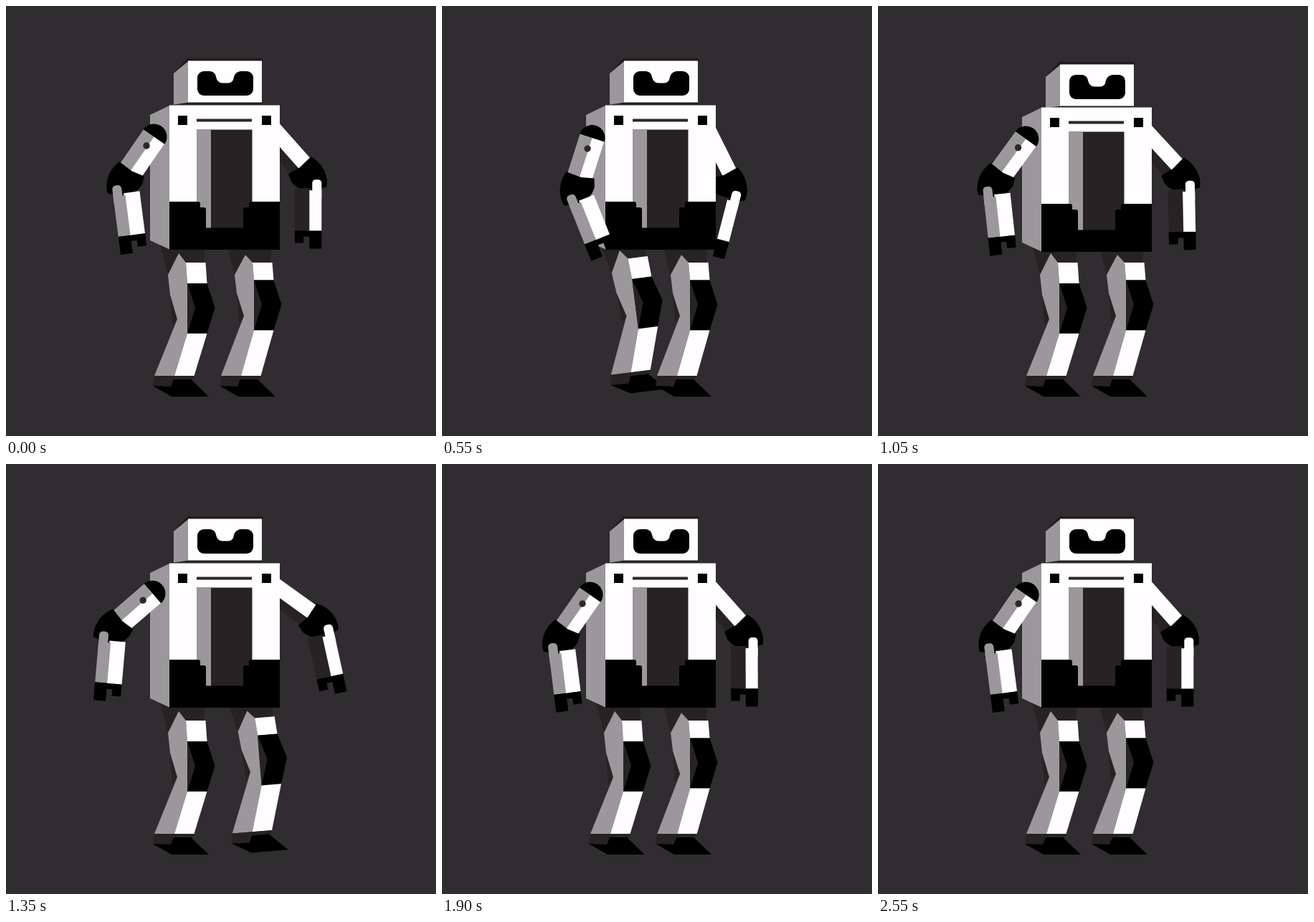
Recreate the animation shown at these times as an HTML page with a canvas. Size 600x600 px, loop 3000 ms.

```html
<!DOCTYPE html>
<html lang="en">
<head>
<meta charset="utf-8">
<title>Robot steps</title>
<style>
  html, body { margin: 0; width: 100%; height: 100%; overflow: hidden; background: #302d30; }
  canvas { display: block; width: 600px; height: 600px; }
</style>
</head>
<body>
<canvas id="stage" width="600" height="600"></canvas>
<script>
const ctx = document.getElementById('stage').getContext('2d');
const LOOP = 3000, STEP = 50;
const BG = '#302d30', DARK = '#272223', GRAY = '#9b989b', WHITE = '#fffdff', BLACK = '#000';

const clamp = x => Math.min(1, Math.max(0, x));
const part = (t, a, b) => clamp((t - a) / (b - a));
const ease = u => (1 - Math.cos(Math.PI * u)) / 2;
const bump = (t, a, peak, b) => ease(t < peak ? part(t, a, peak) : 1 - part(t, peak, b));
const rad = deg => deg * Math.PI / 180;

// Arm swing: -1 is fully in, 0 is rest, 1 is fully out.
function swing(t) {
  if (t < 525) return -ease(part(t, 0, 525));
  if (t < 1525) return -Math.cos(Math.PI * part(t, 525, 1525));
  return 1 - ease(part(t, 1525, 1930));
}

function poly(color, ...points) {
  ctx.fillStyle = color;
  ctx.beginPath();
  points.forEach(p => ctx.lineTo(...p));
  ctx.fill();
}

function box(color, x, y, w, h, r = 0) {
  ctx.fillStyle = color;
  ctx.beginPath();
  ctx.roundRect(x, y, w, h, r);
  ctx.fill();
}

function disc(color, x, y, r, from = 0, to = 2 * Math.PI) {
  ctx.fillStyle = color;
  ctx.beginPath();
  ctx.arc(x, y, r, from, to);
  ctx.fill();
}

function shape(color, d) {
  ctx.fillStyle = color;
  ctx.fill(new Path2D(d));
}

function group(draw, x = 0, y = 0) {
  ctx.save();
  ctx.translate(x, y);
  draw();
  ctx.restore();
}

// The seam between side and front runs hip, knee top, bend, knee bottom, ankle.
function leg(x, lift, pivotX, pivotY, angle) {
  const seam = [[251, 358], [253, 387 - lift], [264, 421 - lift], [253, 457 - lift], [235, 516]];
  const [hip, kneeTop, bend, kneeEnd, ankle] = seam;
  const front = (color, a, b) => {
    const edge = seam.slice(a, b + 1);
    poly(color, ...edge, ...edge.map(([px, py]) => [px + 27.5, py]).reverse());
  };
  const thigh = [226, 375], calf = [229, 403 - lift / 2], hollow = [239, 437 - lift];

  group(() => {
    ctx.translate(pivotX, pivotY);
    ctx.rotate(-angle);
    ctx.translate(x - pivotX, -pivotY);
    poly(DARK, [213, 325], [278, 325], [276, 358], hip, thigh);
    poly(DARK, calf, hollow, [232, 447 - lift]);
    poly(GRAY, [241, 345 + lift / 2], hip, kneeTop, kneeEnd, ankle, [207, 516], hollow, calf, thigh);
    poly(DARK, kneeTop, bend, kneeEnd);
    front(WHITE, 0, 1);
    front(BLACK, 1, 3);
    front(WHITE, 3, 4);
    poly(DARK, [207, 516], [263, 516], [260, 523], [232, 532], [205, 530]);
    poly(BLACK, [205, 530], [230, 531], [234, 521], [258, 521], [283, 545], [231, 545]);
  });
}

const LEFT = {
  x: 212.8, y: 173.5, side: 1, angle: 34.6, reach: 17, length: 83, bend: -7.3,
  split: 0, outer: GRAY, inner: WHITE, cap: true
};
const RIGHT = {
  x: 361, y: 167, side: -1, angle: 41.5, reach: 15, length: 91, bend: 0,
  split: 4, outer: WHITE, inner: DARK, cap: false
};

// Drawn hanging down with its outer half on the left; the other side is mirrored.
function arm(a, v) {
  const turn = a.angle + a.reach * v;
  const fore = a.bend + 14.5 * v;
  group(() => {
    ctx.scale(a.side, 1);
    ctx.rotate(rad(turn));
    box(a.inner, -17.5, 11, 35, a.length - 22);
    box(a.outer, -17.5, 11, 17.5 + a.split, a.length - 22);
    if (a.cap) {
      disc(BLACK, 0, 11, 18, Math.PI);
      disc('#2b282a', -1.6, 27.2, 4.7);
    }
    ctx.translate(0, a.length);
    shape(BLACK, 'M-20 -16 Q-26 2 -18 18 Q-14 26 -8 30 L12 20 Q25 8 24 -8 L20 -19 L2 -15 Z');
    ctx.rotate(rad(fore - turn));
    box(a.inner, -4, 19, 22.5, 60);
    box(a.outer, -19, 22, 17, 57);
    box(a.outer, -19, 7, 13, 30, 5);
    box(BLACK, -19, 78.5, 37.5, 8);
    box(BLACK, -19, 78.5, 17, 25);
    box(BLACK, 6, 78.5, 12.5, 17);
  }, a.x, a.y);
}

function torso() {
  poly(GRAY, [201, 152], [229, 138.5], [229, 340], [201, 327]);
  box(WHITE, 228, 138.5, 154, 136);
  box('#2b282a', 266, 157.5, 77, 4);
  box(DARK, 266, 172.5, 77.5, 139);
  box(GRAY, 266, 172.5, 20, 139);
  box(BLACK, 228, 309.5, 154, 30.5);
  for (const side of [-1, 1]) group(() => {
    ctx.scale(side, 1);
    box(BLACK, 52, 153, 13, 13);
    box(BLACK, 34, 273, 43, 40, [3, 0, 0, 0]);
    box(BLACK, 26, 281, 51, 59, [3, 0, 0, 0]);
  }, 305, 0);
}

function head() {
  poly('#1f1c1e', [234, 94], [253, 73], [358, 73], [358, 78], [254, 78]);
  box('#1f1c1e', 242, 133, 115, 3.5);
  poly(GRAY, [234, 94], [255, 76.5], [255, 134.5], [234, 137.5]);
  box(WHITE, 254, 76.5, 103, 58);
  box(BLACK, 267, 91, 78, 34, 9);
  shape(WHITE, 'M285 90 V91 Q292 92 293 99 Q295 107.5 302 107.5 H310 ' +
    'Q317 107.5 318 99 Q320 92 327 91 V90 Z');
}

function draw(t) {
  const v = swing(t);
  const dip = bump(t, 900, 1025, 1200) + bump(t, 1900, 2025, 2200);
  const leftStep = bump(t, 0, 525, 980);
  const rightStep = bump(t, 1040, 1500, 1930);
  const sink = 3.2 * dip;

  box(BG, 0, 0, 600, 600);
  group(() => arm(RIGHT, v), 0, sink);
  leg(0, 0, 212, 288, 0.127 * leftStep);
  leg(93, 4.5, 300, 315, 0.103 * rightStep);
  group(head, 0, 5.2 * dip);
  group(torso, 0, sink);
  group(() => arm(LEFT, v), 0, sink);
}

const start = performance.now();
function tick() {
  const t = (performance.now() - start) % LOOP;
  draw(Math.floor(t / STEP) * STEP);
  requestAnimationFrame(tick);
}
tick();
</script>
</body>
</html>
```
